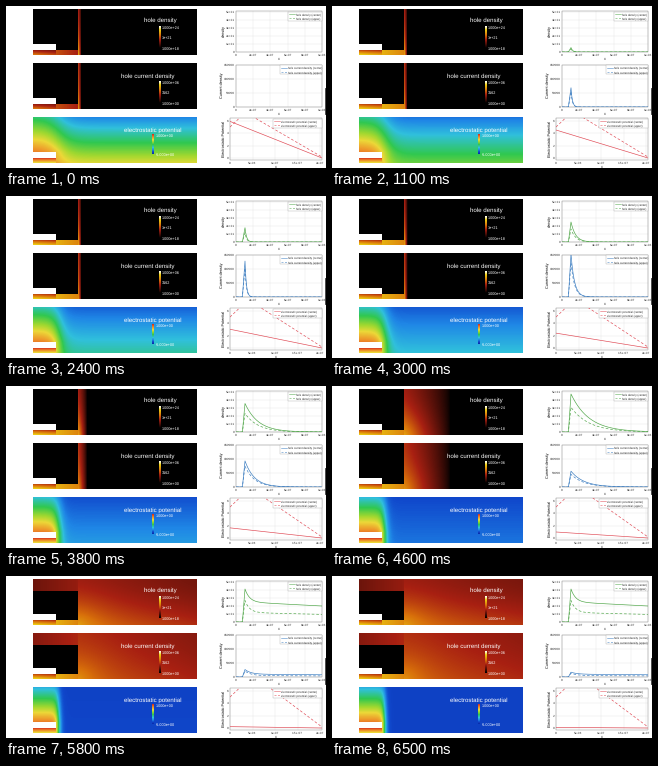
A matplotlib script for the animation above (6600 ms loop, 320x162 px).

```python
import numpy as np
import matplotlib.pyplot as plt
from matplotlib.animation import FuncAnimation
from matplotlib.colors import LinearSegmentedColormap
from matplotlib.patches import Rectangle

W, H, DPI = 320, 162, 100
FRAMES, INTERVAL = 66, 100

heat = LinearSegmentedColormap.from_list("heat", [
    (0, "#000000"), (.39, "#a82012"), (.58, "#d8700a"),
    (.84, "#eed214"), (1, "#ffffff")])
rainbow = LinearSegmentedColormap.from_list("rainbow", [
    (0, "#0a2aa8"), (.1, "#1048cc"), (.2, "#1f86e6"), (.32, "#30c0dc"),
    (.48, "#30c850"), (.62, "#a0d830"), (.72, "#ecd838"),
    (.86, "#ee8a28"), (1, "#d82c20")])

plt.rcParams["font.family"] = "Liberation Sans"
plt.rcParams["text.hinting"] = "none"
fig = plt.figure(figsize=(W / DPI, H / DPI), dpi=DPI, facecolor="white")
ax = fig.add_axes([0, 0, 1, 1])
ax.axis("off")


def px(n):
    return n * 72 / DPI


def ease(n, a, b):
    u = np.clip((n - a) / (b - a), 0, 1)
    return u * u * (3 - 2 * u)


def field_left(n):
    """Share of the initial potential drop not yet screened by charge."""
    return max(0, 1 - n / 62) ** 1.4


def spread(n):
    return ease(n, 24, 46)


def settled(n):
    return ease(n, 46, 58)


def text(x, y, s, size, color="black", ha="left"):
    ax.text(x, y, s, fontsize=px(size), color=color, ha=ha,
            va="center_baseline", zorder=7)


def line(xs, ys, color, width=.6, **kw):
    return ax.plot(xs, ys, color=color, lw=px(width), **kw)[0]


# Device cross-sections
LEFT, PW, PH, EDGE, CONTACT = 26.5, 164, 46, 72, 50
TOPS = (3.4, 57.4, 111.4)
gx, gy = np.meshgrid(LEFT + np.arange(PW) + .5, np.arange(PH) + .5)
depth = gy / PH
body = gx >= EDGE
contact = (gx < CONTACT) & (gy > 34.5) & (gy < 41)
channel = ~body & (gy > 40.5)
strip = ~body & (gy < 12)


def shade(v, cmap):
    rgb = cmap(np.clip(v, 0, 1))[..., :3]
    rgb[contact] = 1
    return rgb


def carriers(n, top, gain):
    reach = 3 * 150 ** ease(n, 28, 62)
    front = np.clip(1 - (gx - EDGE) / reach, 0, 1) ** .7
    corner = np.exp(-np.hypot(gx - EDGE, gy - PH) / 22)
    v = np.where(body, front * (top + gain * depth ** 1.5 + .16 * corner), 0)
    v = np.where(strip, settled(n) * (top - .1 * (EDGE - gx) / 46), v)
    film = .5 + .25 * min(n / 10, 1) - .12 * (gx - CONTACT) / (EDGE - CONTACT)
    under = film * (.45 + .09 * (gy - 40))
    v = np.where(channel, np.where(gx < CONTACT, under, film), v)
    return shade(v, heat)


def density(n):
    return carriers(n, .35, .2)


def current(n):
    return carriers(n, .41, .1)


def potential(n):
    c = field_left(n)
    right = .08 + c * (.12 + .5 * depth)
    left = .28 + .17 * c + .6 * np.clip(gy / 35, 0, 1) * (1 - .28 * c)
    w = 1 / (1 + np.exp((gx - 52) / (1.6 + 5 * c)))
    v = right + (left - right) * w
    v = np.where((gx < CONTACT) & (gy > 41), .96 - .06 * (gy - 41.5), v)
    return shade(v, rainbow)


fields = (density, current, potential)
images = [ax.imshow(f(0), extent=(LEFT, LEFT + PW, top + PH, top),
                    interpolation="nearest", aspect="auto", zorder=1)
          for f, top in zip(fields, TOPS)]


def colorbar(x, y0, y1, cmap, labels):
    ax.imshow(np.linspace(1, 0, 64)[:, None], cmap=cmap, aspect="auto",
              extent=(x, x + 1.8, y1, y0), zorder=3)
    for y, s in zip(np.linspace(y0 + .3, y1 + .2, len(labels)), labels):
        text(x + 3.2, y, s, 3.8, "white")


text(154, 14, "hole density", 6.1, "white", "center")
text(141.5, 70, "hole current density", 6.1, "white", "center")
text(146.5, 123.3, "electrostatic potential", 6.1, "white", "center")
colorbar(152.7, 20.8, 42.5, heat, ["1.000e+24", "1e+21", "1.000e+18"])
colorbar(152.7, 75.8, 97.5, heat, ["1.000e+06", "3162", "1.000e+00"])
colorbar(146.2, 129, 148.5, rainbow, ["1.000e+00", "-5.000e+00"])
ax.set_xlim(0, W)
ax.set_ylim(H, 0)
ax.set_autoscale_on(False)


# Line plots
RIGHT = 316


def plot_frame(x0, y0, y1, xticks, yticks, ylabel, yx, name, lx, color):
    box = Rectangle((x0, y0), RIGHT - x0, y1 - y0, fill=False,
                    ec="#888888", lw=px(.45), zorder=2)
    ax.add_patch(box)
    for x, s in xticks:
        line([x, x], [y0, y1], "#e2e2e2", .35, zorder=1)
        text(x, y1 + 3.3, s, 3.3, "#333333", "center")
    for y, s in yticks:
        line([x0, RIGHT], [y, y], "#e2e2e2", .35, zorder=1)
        text(x0 - 1, y, s, 3.3, "#333333", "right")
    text((x0 + RIGHT) / 2, y1 + 6.4, "x", 3.6, "#222222", "center")
    ax.text(yx, (y0 + y1) / 2, ylabel, fontsize=px(3.8), rotation=90,
            ha="center", va="center")
    ax.add_patch(Rectangle((lx, y0 + .7), RIGHT - lx - .5, 9, fc="white",
                           ec="#aaaaaa", lw=px(.4), zorder=5))
    curves = []
    for i, (part, style) in enumerate((("center", "-"), ("upper", (0, (4, 3))))):
        y = y0 + 3 + 4.3 * i
        line([lx + 1, lx + 6.5], [y, y], color, .5, ls=style, zorder=6)
        text(lx + 8, y, f"{name} ({part})", 2.75, "#222222")
        c = line([], [], color, .65, ls=style, zorder=4)
        c.set_clip_path(box)
        curves.append(c)
    return curves


def ticks(start, step, labels):
    return [(start + step * i, s) for i, s in enumerate(labels)]


wide = ticks(230, 17.2, ["0", "2e-07", "4e-07", "6e-07", "8e-07", "1e-06"])
near = ticks(224, 22.5, ["0", "5e-08", "1e-07", "1.5e-07", "2e-07"])
green = plot_frame(230, 5, 46, wide,
                   ticks(46, -8, ["0"] + [f"{i}e+21" for i in range(1, 6)]),
                   "density", 218, "hole density", 282, "#4fa648")
blue = plot_frame(230, 58.5, 101, wide,
                  ticks(101, -14.1, ["0", "50000", "100000", "150000"]),
                  "Current density", 216.5, "hole current density", 274, "#3a7cc0")
red = plot_frame(224, 112, 154, near, ticks(152, -12.5, "0246"),
                 "Electrostatic Potential", 218,
                 "electrostatic potential", 267, "#e04a55")
line([319, 319], [82, 108], "#222222", .8)

xs = np.linspace(230, RIGHT, 345)


def pulse(curve, base, peak, plateau, tau):
    d = xs - 239
    rise = peak * np.clip(1 + d / 2.6, 0, 1)
    rest = plateau * (1 - .2 * d / 77)
    tail = rest + (peak - plateau) * np.exp(-d.clip(0) / tau)
    curve.set_data(xs, base - np.where(d < 0, rise, tail))


def update(n):
    for im, f in zip(images, fields):
        im.set_data(f(n))

    end = settled(n)
    peak = 38 * min(n / 46, 1) ** 1.5 - 5 * end
    tau = 1.6 + 16.5 * spread(n) - 13.5 * end
    pulse(green[0], 46, peak, 20 * end, tau)
    pulse(green[1], 46, .65 * peak, 9.5 * end, tau)

    peak = 43 * min(n / 30, 1) ** .8 * np.exp(-max(0, n - 30) / 16)
    tau = 1.4 + 11.5 * spread(n) - 7 * end
    pulse(blue[0], 101, peak, 2.8 * end, tau)
    pulse(blue[1], 101, .8 * peak, 1.4 * end, tau)

    red[0].set_data([224, RIGHT], [152 - 36 * field_left(n) - .6, 152])
    fall = 249 + 15 * min(n / 58, 1)
    red[1].set_data([224, 233.5, 240, fall, RIGHT], [121, 112, 104, 112, 151])
    return images + green + blue + red


anim = FuncAnimation(fig, update, frames=FRAMES, interval=INTERVAL,
                     init_func=lambda: update(0), repeat=True, repeat_delay=0)
plt.show()
```
